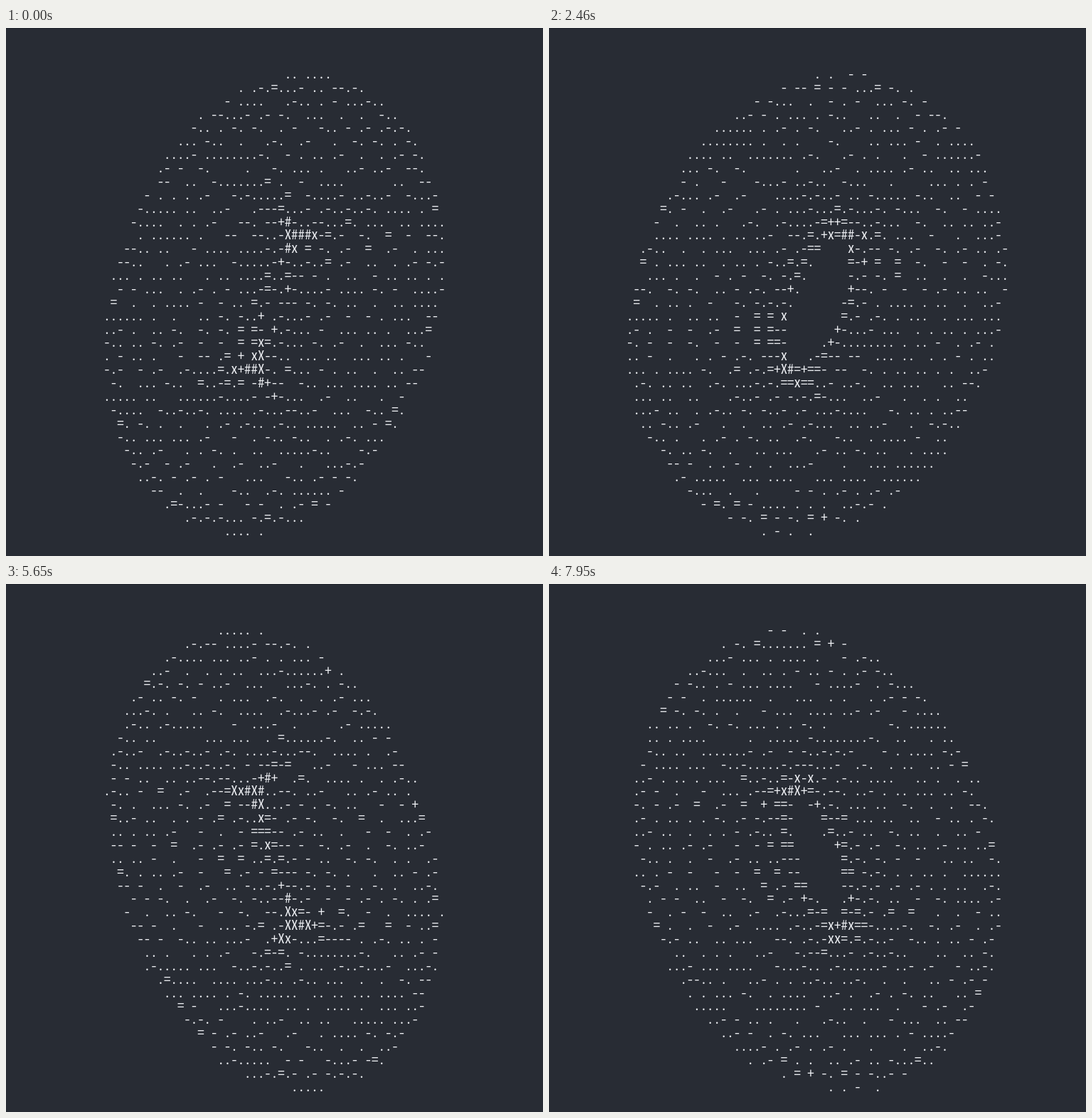
Recreate the animation shown at these times as an HTML page with a canvas. Size 755 by 742 pixels, loop 8 s.

```html
<!DOCTYPE html>
<html lang="en">
<head>
<meta charset="utf-8">
<title>ASCII torus</title>
<style>
  html, body { margin: 0; width: 100%; height: 100%; overflow: hidden; background: #282c34; }
  canvas { display: block; }
</style>
</head>
<body>
<canvas id="stage" width="755" height="742"></canvas>
<script>
const ctx = document.getElementById('stage').getContext('2d');
const DEG = Math.PI / 180;
const LOOP = 8000;

// Character grid
const CELL_W = 9.42, CELL_H = 18.87;
const CENTER_X = 377.5, BASELINE = 391.8;
const FAMILY = '"Noto Sans Mono CJK JP", "Noto Sans Mono", monospace';
const RAMP = ' .-=+xX#';
const HALF_COLS = 36, HALF_ROWS = 18;
const COLS = HALF_COLS * 2 + 1, ROWS = HALF_ROWS * 2 + 1;

// Torus, measured in columns; the ring is twice as wide as the tube
const MINOR = 11.412, MAJOR = 2 * MINOR, TILT = 14.36 * DEG;
const RINGS = 63, RING_STEP = 0.1, RING_START = 0.011;
const SIDES = 21, SIDE_STEP = 0.3;
const START_ANGLE = 55.9 * DEG, STEP_ANGLE = 2.243 * DEG;

// [time in ms, step number]; steps are evenly spaced in between
const PACE = [[0, 0], [870, 13], [1760, 26], [2600, 37], [7950, 114]];
const LAST_STEP = 114;

const points = [];
for (let i = 0; i < RINGS; i++) {
  const u = RING_START + i * RING_STEP;
  for (let j = 0; j < SIDES; j++) {
    const v = j * SIDE_STEP;
    const reach = MAJOR + MINOR * Math.cos(v);
    const y = reach * Math.sin(u), z = -MINOR * Math.sin(v);
    points.push({
      x: reach * Math.cos(u),
      y: y * Math.cos(TILT) - z * Math.sin(TILT),
      z: y * Math.sin(TILT) + z * Math.cos(TILT),
    });
  }
}

function stepAt(time) {
  let k = 1;
  while (k < PACE.length - 1 && time >= PACE[k][0]) k++;
  const [t0, s0] = PACE[k - 1], [t1, s1] = PACE[k];
  const step = s0 + (time - t0) / (t1 - t0) * (s1 - s0);
  return Math.min(LAST_STEP, Math.floor(step + 0.15));
}

function countPoints(angle) {
  const counts = new Uint8Array(COLS * ROWS);
  const cos = Math.cos(angle), sin = Math.sin(angle);
  for (const p of points) {
    const col = Math.round(p.x * cos + p.z * sin) + HALF_COLS;
    const row = Math.round(-p.y / 2) + HALF_ROWS;
    counts[row * COLS + col]++;
  }
  return counts;
}

// Font size at which one character is as wide as a cell
function cellFont() {
  ctx.font = `100px ${FAMILY}`;
  return `${100 * CELL_W / ctx.measureText('x').width}px ${FAMILY}`;
}

function draw(step) {
  ctx.fillStyle = '#282c34';
  ctx.fillRect(0, 0, 755, 742);
  ctx.fillStyle = '#20242b';
  ctx.fillRect(0, 0, 755, 1);
  ctx.fillStyle = '#eceef2';
  ctx.font = cellFont();
  ctx.textAlign = 'center';
  countPoints(START_ANGLE + STEP_ANGLE * step).forEach((count, i) => {
    if (!count) return;
    const col = i % COLS - HALF_COLS, row = Math.floor(i / COLS) - HALF_ROWS;
    const glyph = RAMP[Math.min(count, RAMP.length - 1)];
    ctx.fillText(glyph, CENTER_X + col * CELL_W, BASELINE + row * CELL_H);
  });
}

let shown = -1;
function tick() {
  const step = stepAt(performance.now() % LOOP);
  if (step !== shown) draw(shown = step);
  requestAnimationFrame(tick);
}
tick();
</script>
</body>
</html>
```
